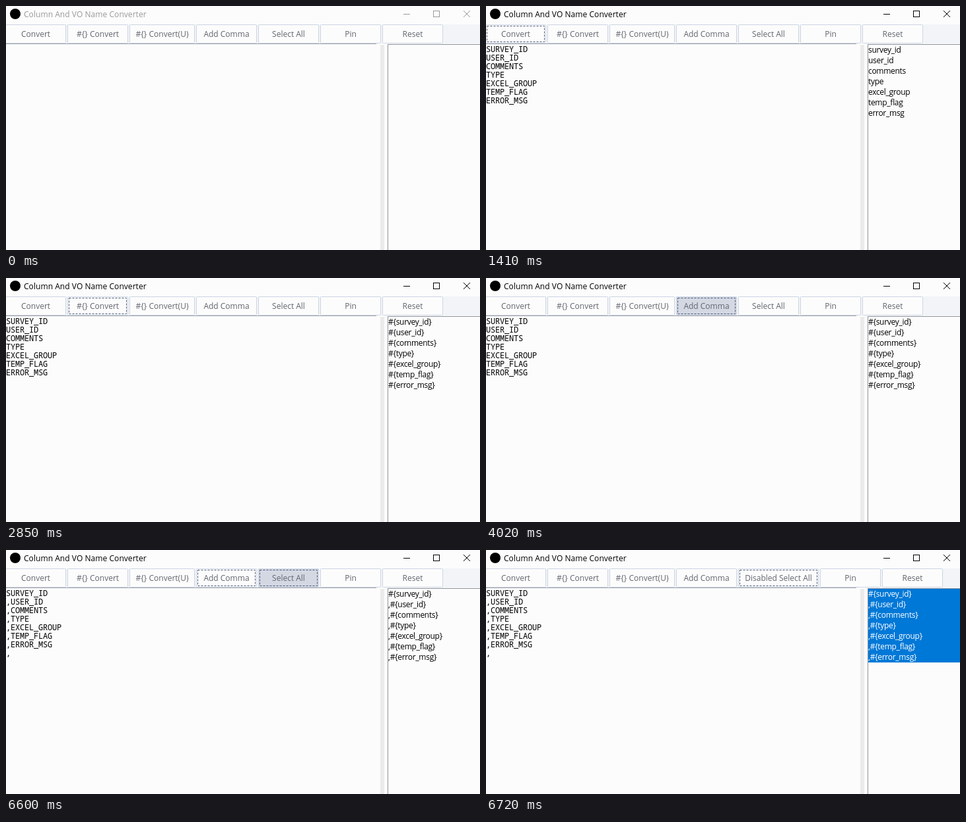
Animation, 718 px wide and 371 px high, one loop 8 s. Source, as an HTML page with a canvas:

```html
<!DOCTYPE html>
<html lang="en">
<head>
<meta charset="utf-8">
<title>Column And VO Name Converter</title>
<style>
  html, body { margin: 0; width: 100%; height: 100%; overflow: hidden; background: #fcfcfc; }
  canvas { display: block; }
</style>
</head>
<body>
<canvas id="stage" width="718" height="371"></canvas>
<script>
const ctx = document.getElementById('stage').getContext('2d');
const LOOP = 8000;
const UI = '12px "Open Sans", "Noto Sans", sans-serif';
const MONO = '12px "Noto Sans Mono", "DejaVu Sans Mono", monospace';
const NAMES = ['SURVEY_ID', 'USER_ID', 'COMMENTS', 'TYPE', 'EXCEL_GROUP', 'TEMP_FLAG', 'ERROR_MSG'];
const LABELS = ['Convert', '#{} Convert', '#{} Convert(U)', 'Add Comma', 'Select All', 'Pin', 'Reset'];

const lower = NAMES.map(s => s.toLowerCase());
const wrapped = lower.map(s => `#{${s}}`);
const withCommas = list => list.map((s, i) => (i ? ',' : '') + s);

// Each step overrides part of the window state from its time on.
const STEPS = [
  [0, { active: false, caret: null, left: [], right: [], pressed: -1, focus: [], selected: false }],
  [300, { active: true, caret: [0, 59] }],
  [660, { left: NAMES, caret: [63, 137] }],
  [1260, { pressed: 0, focus: [0], caret: null }],
  [1380, { pressed: -1 }],
  [1410, { right: lower }],
  [2760, { pressed: 1, focus: [1] }],
  [2850, { pressed: -1, right: wrapped }],
  [4020, { pressed: 3, focus: [3] }],
  [4080, { pressed: -1, left: [...withCommas(NAMES), ','] }],
  [4110, { right: withCommas(wrapped) }],
  [6600, { pressed: 4, focus: [3, 4] }],
  [6630, { focus: [4] }],
  [6690, { pressed: -1, selected: true }],
];

function stateAt(t) {
  return Object.assign({}, ...STEPS.filter(([at]) => at <= t).map(([, change]) => change));
}

function rect(x, y, w, h, color) {
  ctx.fillStyle = color;
  ctx.fillRect(x, y, w, h);
}

function text(str, x, y, color, { font = UI, align = 'left', spacing = 0 } = {}) {
  ctx.font = font;
  ctx.textAlign = align;
  ctx.letterSpacing = spacing + 'px';
  ctx.fillStyle = color;
  ctx.fillText(str, x, y);
}

function titleBar(active) {
  const color = active ? '#000' : '#999';
  ctx.fillStyle = '#000';
  ctx.beginPath();
  ctx.arc(14, 12, 8, 0, 7);
  ctx.fill();
  text('Column And VO Name Converter', 27, 17, color, { spacing: 0.05 });
  rect(602, 12, 10, 1, color);
  ctx.strokeStyle = color;
  ctx.lineWidth = 1;
  ctx.strokeRect(647.5, 7.5, 9, 9);
  ctx.beginPath();
  ctx.moveTo(693, 7);
  ctx.lineTo(703, 17);
  ctx.moveTo(703, 7);
  ctx.lineTo(693, 17);
  ctx.stroke();
}

function button(label, x, w, pressed, focused) {
  ctx.beginPath();
  ctx.roundRect(x + 0.5, 28.5, w - 1, 28, 1);
  ctx.fillStyle = pressed ? '#d3d8e3' : '#fcfcfc';
  ctx.fill();
  ctx.strokeStyle = '#cdd5e3';
  ctx.stroke();
  if (focused) {
    ctx.strokeStyle = '#4c5a78';
    ctx.setLineDash([3, 2]);
    ctx.strokeRect(x + 2.5, 30.5, w - 5, 24);
    ctx.setLineDash([]);
  }
  text(label, x + w / 2, 47, '#62666e', { align: 'center' });
}

function toolbar(s) {
  rect(0, 28, 718, 29, '#f2f4f7');
  let x = -1;
  LABELS.forEach((label, i) => {
    const wide = i === 4 && s.selected;
    const w = wide ? 122 : i === 2 ? 99 : 92;
    button(wide ? 'Disabled Select All' : label, x, w, s.pressed === i, s.focus.includes(i));
    x += w + 2;
  });
}

function panes(s) {
  rect(0, 57, 561, 1, '#9a9fa8');
  rect(567, 59, 6, 312, '#ebebeb');
  rect(578, 58, 140, 1, '#8e939b');
  rect(578, 58, 1, 313, '#8e939b');
  s.left.forEach((line, i) => text(line, 0, 70 + 13 * i, '#000', { font: MONO, spacing: -0.2 }));
  if (s.caret) rect(...s.caret, 1, 13, '#000');
  if (s.selected) rect(579, 59, 139, 112, '#0078d7');
  const ink = s.selected ? '#fff' : '#000';
  s.right.forEach((line, i) => text(line, 579, 71 + 16 * i, ink, { spacing: -0.3 }));
}

function draw() {
  const s = stateAt(performance.now() % LOOP);
  rect(0, 0, 718, 371, '#fcfcfc');
  titleBar(s.active);
  toolbar(s);
  panes(s);
  requestAnimationFrame(draw);
}
draw();
</script>
</body>
</html>
```
